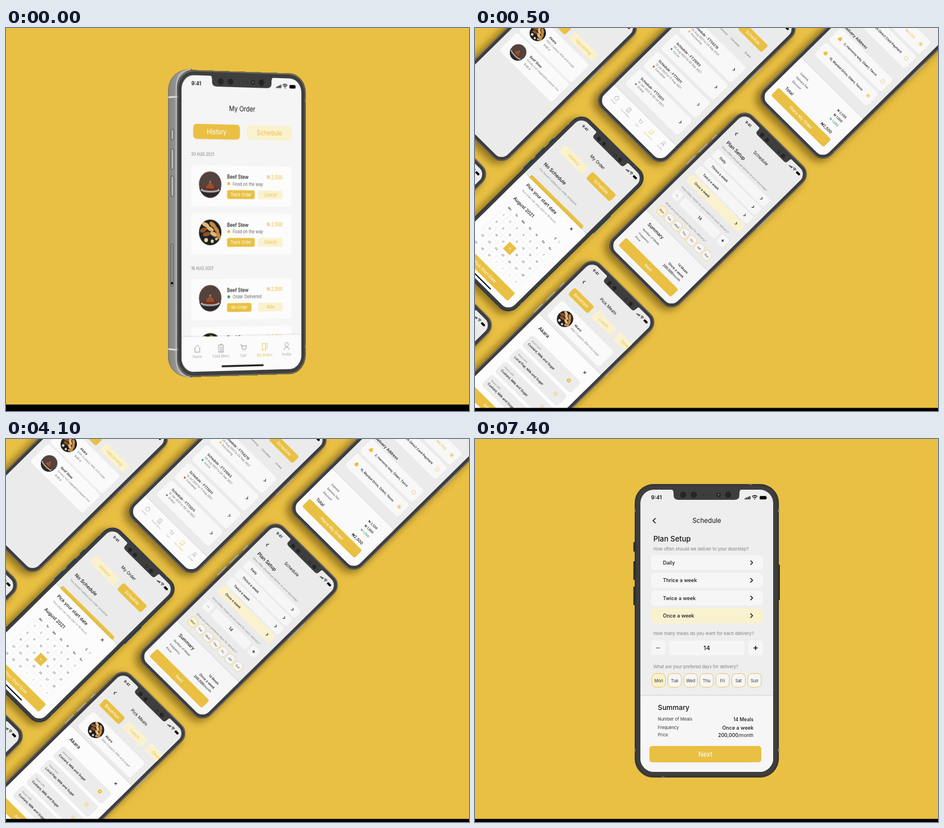
An HTML page for the animation above (8000 ms loop, 823 px wide and 680 px high).

```html
<!DOCTYPE html>
<html lang="en">
<head>
<meta charset="utf-8">
<title>Food ordering app showcase</title>
<style>
  html, body { margin: 0; width: 100%; height: 100%; overflow: hidden; background: #e9c043; }
  body { position: relative; }
  svg { position: absolute; left: 0; top: 0; overflow: visible; }
  text { font-family: Inter, sans-serif; white-space: pre; }
  .scene { position: absolute; left: 0; top: 0; width: 823px; height: 680px; overflow: hidden; visibility: hidden; }
  /* flat phone turned slightly away to the right */
  .turned { transform-origin: 0 0; transform: matrix3d(.9603,.0407,0,.00011, 0,1.054,0,0, 0,0,1,0, 312,83,0,1); }
  .shadow { filter: blur(10px); }
</style>
</head>
<body>
<svg width="0" height="0"><defs>
  <clipPath id="screen"><rect width="236" height="501" rx="24"/></clipPath>
  <linearGradient id="metal"><stop stop-color="#858683"/><stop offset=".5" stop-color="#a3a4a0"/><stop offset="1" stop-color="#8d8e8a"/></linearGradient>
</defs></svg>
<script>
const YELLOW = '#e9c043', PALE = '#faf2cf', INK = '#151515', GREY = '#82828a', GREEN = '#3b9a63';

// ---- drawing helpers; a phone screen measures 236 x 501 ----
const box = (x, y, w, h, fill, r = 5, extra = '') =>
  `<rect x="${x}" y="${y}" width="${w}" height="${h}" rx="${r}" fill="${fill}" ${extra}/>`;
const dot = (x, y, r, fill, extra = '') => `<circle cx="${x}" cy="${y}" r="${r}" fill="${fill}" ${extra}/>`;
const line = (d, color = INK, width = 1, extra = '') =>
  `<path d="${d}" fill="none" stroke="${color}" stroke-width="${width}" ${extra}/>`;
// y is the middle of the capitals
const text = (x, y, s, size, color = INK, weight = 400, anchor = 'start') =>
  `<text x="${x}" y="${y + size * .36}" font-size="${size}" fill="${color}" font-weight="${weight}" text-anchor="${anchor}">${s}</text>`;
const mid = (x, y, s, size, color, weight) => text(x, y, s, size, color, weight, 'middle');
const end = (x, y, s, size, color, weight) => text(x, y, s, size, color, weight, 'end');
const next = (x, y, s = 1) => line(`M${x - 2 * s} ${y - 4 * s}l${4 * s} ${4 * s}l${-4 * s} ${4 * s}`, INK, 1.5);
const cross = (x, y) => line(`M${x - 3} ${y - 3}l6 6m0-6l-6 6`, INK, 1.4);
const title = s => mid(118, 55, s, 11.6);
const back = () => line('M27 50.5l-4.5 4.5l4.5 4.5', INK, 1.6);
const button = (s, y = 455) => box(16, y, 199, 29, YELLOW, 5) + mid(115.5, y + 15, s, 11.4, '#fff');
const indicator = () => box(77.5, 491.5, 83, 3, '#111', 1.5);
const sheet = (y, fill) => box(0, y - 2, 236, 510 - y, '#00000010', 4) + box(0, y, 236, 510 - y, fill, 3);
const radio = (x, y, on) => dot(x, y, 5, 'none', `stroke="${YELLOW}"`) + (on ? dot(x, y, 2.6, YELLOW) : '');
const tab = (x, y, w, s, on) =>
  box(x, y, w, 25.5, on ? YELLOW : PALE, 6) + mid(x + w / 2, y + 12.7, s, 11.4, on ? '#fff' : YELLOW);

function statusBar() {
  const bars = [0, 1, 2, 3].map(i => box(185.5 + i * 2.7, 15 - i * 1.2, 1.9, 2.2 + i * 1.2, INK, .5)).join('');
  const wifi = line('M198.5 12.2q4.7-4 9.4 0M200.2 14.4q3-2.4 6 0', INK, 1.4) + dot(203.2, 16.4, 1, INK);
  return mid(28.5, 14, '9:41', 9.5, INK, 600) + bars + wifi +
    box(212, 11.2, 12, 6, '#000', 1.5) + box(224.4, 13, 1, 2.4, '#777', .5);
}

function notch() {
  const lens = [76, 95, 139, 156].map((x, i) => dot(x, 9, i === 2 ? 4 : 5.5, '#252525')).join('');
  return `<path d="M54 -1H181Q176 0 176 6V10Q176 18 167 18H68Q59 18 59 10V6Q59 0 54 -1Z" fill="#3e3e3e"/>` + lens +
    dot(139, 9, 1.4, '#777') + [111, 119, 127].map(x => dot(x, 9, .9, '#2b2b2b')).join('');
}

// edge: width of the frame around the screen
function phone(content, { bg = '#ebebeb', rim = '#4a4a4a', keys = '#33312d', edge = 9.5, buttons = true, shadow = false } = {}) {
  const ring = (e, fill, extra) => box(-e, -e, 236 + 2 * e, 501 + 2 * e, fill, 23.5 + e, extra);
  const sides = buttons ? [[-12.5, 93, 17], [-12.5, 127, 33], [-12.5, 172, 33], [244, 133, 63]]
    .map(([x, y, h]) => box(x, y, 4, h, keys, 1)).join('') : '';
  const bands = [[-edge - 1, 35, 2, 5], [235 + edge, 35, 2, 5], [-edge - 1, 460, 2, 5], [235 + edge, 460, 2, 5], [193, -edge - 1, 5, 2], [38, 500 + edge, 5, 2]]
    .map(([x, y, w, h]) => box(x, y, w, h, '#777', 0)).join('');
  return (shadow ? box(-18, 2, 264, 523, '#4a340088', 36, 'class="shadow"') : '') + sides +
    ring(edge, rim, 'stroke="#262626" stroke-width="1.2"') + ring(edge - 1.8, '#3e3e3e', 'stroke="#2a2a2a" stroke-width=".8"') + bands +
    `<g clip-path="url(#screen)">${box(0, 0, 236, 501, bg, 0)}${content}${statusBar()}</g>` + notch();
}

function dish(x, y, grilled) {
  const art = grilled
    ? dot(0, 0, 21.8, '#1d1f20') +
      [[-9, -13, 20], [5, -13, 35], [-13, -4, -20], [0, -6, 25], [12, -5, 50], [-7, 3, -12], [7, 3, 20], [16, 5, 70]].map(([a, b, r], i) =>
        `<ellipse cx="${a}" cy="${b}" rx="7.5" ry="3.6" fill="${['#e2b878', '#c98840', '#8f5325'][i % 3]}" transform="rotate(${r} ${a} ${b})"/>`).join('') +
      dot(-8, 13, 3.6, '#e8d6b8') + dot(4, 15, 3, '#e8d6b8') + dot(12, 11, 2.6, '#d9b98c')
    : dot(0, 0, 21.8, '#54423e') + `<path d="M-21 7A21.8 21.8 0 0 0 21 7Z" fill="#2f2827"/>` +
      `<ellipse cy="9.5" rx="18.5" ry="4.5" fill="#9fb2b8"/><ellipse cy="7.5" rx="16" ry="3.4" fill="#6e2e1a"/>` +
      `<path d="M-8 7Q-7 0 0-3Q7 0 8 7Z" fill="#96502f"/>` + dot(0, -4, 1.8, '#b98058');
  return `<g transform="translate(${x} ${y})">${art}</g>`;
}

function tabBar() {
  const icons = [
    ['Home', 30.5, 'M-6 0L0-6L6 0M-4.5-1V6H4.5V-1'],
    ['Food Menu', 76.5, 'M-4.5-5H4.5V7H-4.5ZM-2-6.5H2M-2.5-1H3M-2.5 2H3M-2.5 5H3'],
    ['Cart', 120.5, 'M-6-5H-4L-2 3H4.5L6-3H-3.5M-1.5 5.5V6.5M4 5.5V6.5'],
    ['My Orders', 162.5, 'M-5-6H2V6L-1.5 3L-5 6ZM2-6H5V2H2'],
    ['Profile', 206.5, 'M0-7A3.4 3.8 0 1 1-.1-7M-5 6Q-4.5 1 0 1Q4.5 1 5 6'],
  ];
  return sheet(442, '#fbfbfb') + icons.map(([label, x, d]) => {
    const color = label === 'My Orders' ? YELLOW : '#8c8c8c';
    return line(d, color, .9, `transform="translate(${x} 462)"`) + mid(x, 475.5, label, 6.2, color === YELLOW ? YELLOW : '#a5a5a5');
  }).join('');
}

const orderTabs = history => title('My Order') + tab(22.5, 82, 91, 'History', history) + tab(127, 82, 90, 'Schedule', !history);

// ---- screens ----
function historyScreen() {
  const order = (y, grilled, done) => box(18.4, y, 198, 69.5, '#fcfcfc') + dish(55.4, y + 32, grilled) +
    text(88.3, y + 19, 'Beef Stew', 8.7, INK, 500) + end(198.5, y + 19, '₦ 2,500', 8.3, YELLOW, 500) +
    dot(91.6, y + 30.5, 2.6, done ? GREEN : '#e8b52c') +
    text(99.3, y + 30.8, done ? 'Order Delivered' : 'Food on the way', 7.7, '#666') +
    box(88.3, y + 41.6, done ? 48 : 54.4, 15, YELLOW, 3) +
    mid(done ? 112.3 : 115.5, y + 49.2, done ? 'Re-Order' : 'Track Order', 7.4, '#fff') +
    box(149.4, y + 41.6, 49, 15, PALE, 3) + mid(174, y + 49.2, done ? 'Rate' : 'Cancel', 7.4, YELLOW);
  return orderTabs(true) + text(18.4, 133.5, '20 AUG 2021', 7.2, '#777') + order(152, false) + order(233.5, true) +
    text(18.4, 326.5, '19 AUG 2021', 7.2, '#777') + order(344.5, false, true) + order(426, true, true) + tabBar() + indicator();
}

function planScreen() {
  const options = ['Daily', 'Thrice a week', 'Twice a week', 'Once a week'].map((s, i) => {
    const y = 116.3 + i * 31.4;
    return box(19, y, 199, 26.5, i === 3 ? PALE : '#f6f6f6', 6) + text(40, y + 13.2, s, 9, INK, 500) + next(197.5, y + 13.2, .95);
  }).join('');
  const days = ['Mon', 'Tue', 'Wed', 'Thu', 'Fri', 'Sat', 'Sun'].map((s, i) => {
    const x = 20.5 + i * 28.4;
    return box(x, 326.5, 24, 24, i ? '#f6f6f6' : PALE, 7, `stroke="${YELLOW}" stroke-width=".9"`) + mid(x + 12, 338.8, s, 7.5, '#333');
  }).join('');
  return back() + title('Schedule') + text(23, 87, 'Plan Setup', 13, INK, 500) +
    text(23, 105, 'How often should we deliver to your doorstep?', 7.7, GREY) + options +
    text(23, 255.5, 'How many meals do you want for each delivery?', 7.8, GREY) +
    box(19, 267.5, 25, 26, '#f6f6f6') + box(51.5, 268, 133.5, 26, '#f6f6f6') + box(192, 268, 25.5, 26, '#f6f6f6') +
    line('M28 281h6.5', '#555', 1.2) + line('M201 281h7.5M204.7 277.2v7.5', INK, 1.6) + mid(118, 281, '14', 11, INK, 500) +
    text(23, 314.5, 'What are your prefered days for delivery?', 7.7, GREY) + days +
    sheet(366, '#f6f6f6') + text(31, 387, 'Summary', 12.3, INK, 500) +
    ['Number of Meals', 'Frequency', 'Price'].map((s, i) => text(31, [407, 422, 435][i], s, 7.5, '#333')).join('') +
    end(201, 407.5, '14 Meals', 8.5, INK, 500) + end(201, 423, 'Once a week', 9, INK, 500) +
    end(201, 436, '200,000<tspan font-weight="400" font-size="8">/month</tspan>', 8.9, INK, 500) + button('Next');
}

function calendarScreen() {
  const x0 = 28.5, y0 = 317, step = 25.5;
  let grid = '';
  for (let i = 0; i <= 7; i++) grid += line(`M${x0 + i * step} ${y0}v${5 * step}`, '#e6e6e6', .8);
  for (let i = 0; i <= 5; i++) grid += line(`M${x0} ${y0 + i * step}h${7 * step}`, '#e6e6e6', .8);
  for (let i = 0; i < 35; i++) {
    const x = x0 + (i % 7) * step, y = y0 + Math.floor(i / 7) * step, today = i === 17;
    if (today) grid += box(x, y, step, step, YELLOW, 0);
    grid += mid(x + step / 2, y + step / 2, i % 31 + 1, 7, today ? '#fff' : i > 30 ? '#aaa' : '#444');
  }
  return orderTabs(false) + text(20, 156, 'No Schedule', 13, INK, 500) +
    text(20, 175, "You haven't added any order schedule", 7.7, GREY) + box(17, 201, 199, 29, YELLOW) + sheet(211, '#fcfcfc') +
    text(27, 228.5, 'Pick your start date', 12, INK, 500) + text(28, 247.5, 'Your plan can only start in 18 hours', 7.7, GREY) + cross(197, 229.5) +
    text(28, 277, 'August 2021', 12.3, INK, 500) + line('M187 273.5l-3.5 3.5l3.5 3.5', '#333', 1.1) + line('M197 273.5l3.5 3.5l-3.5 3.5', '#aaa', 1.1) +
    ['Mo', 'Tu', 'We', 'Th', 'Fr', 'Sa', 'Su'].map((s, i) => mid(41.3 + i * step, 305.8, s, 7, INK, 500)).join('') +
    grid + button('Pick Start Date') + indicator();
}

function mealScreen() {
  const meals = ['Custard, Milk and Sugar', 'Local Pap, Milk and Sugar', 'Custard, Milk and Sugar', 'Custard, Milk and Sugar'].map((s, i) => {
    const y = 249 + i * 49.8;
    return box(28, y, 186, 41, '#ececec', 8) + text(39, y + 13, 'Akara with', 6.8, GREY) + text(38, y + 25, s, 8.7, INK, 500) +
      radio(186, y + 19, false) + (i ? dot(186, y + 19, 1.5, YELLOW) : dot(186, y + 19, 5, YELLOW) + dot(186, y + 19, 1.4, '#fff'));
  }).join('');
  return back() + title('Pick Meals') + tab(18, 82, 75, 'Breakfast', true) + tab(105, 82, 73, 'Lunch') + tab(190, 82, 72, 'Dinner') +
    box(18, 131.5, 200, 58, '#0000000c', 8) + box(18, 130, 200, 58, '#fafafa', 8) + dish(60.5, 159.5, true) +
    text(90, 152, 'Akara', 8.8, INK, 500) + text(89, 165.5, 'With Custard, Milk and sugar', 7.8, GREY) +
    sheet(198, '#fcfcfc') + text(28, 223.5, 'Akara', 13, INK, 500) + cross(201, 223.5) + meals + button('Add to Schedule');
}

function scheduleScreen() {
  const plans = [
    ['FT54219', '25 Aug 2021 to 24 Sep 2021', 'Processing', '#e8b52c'],
    ['FT31093', '05 Aug 2021 to 04 Sep 2021', 'Active', GREEN],
    ['FT73011', '12 Jul 2021 to 11 Aug 2021', 'Cancelled', '#d9541e'],
    ['FT73011', '10 Jan 2021 to 09 Jul 2021', 'Ended', '#777'],
  ];
  return orderTabs(false) +
    ['All', 'Active', 'Processing', 'Cancelled', 'Ended'].map((s, i) => mid([28, 60, 100, 147, 195][i], 137, s, 6.8, '#666')).join('') +
    plans.map(([id, dates, state, color], i) => {
      const y = 180.5 + i * 66.2;
      return box(18, y - 16, 200, 57, '#f8f8f8', 7) + text(38, y, 'Schedule - ' + id, 9.2, INK, 500) +
        text(39, y + 11.5, dates, 7.7, '#666') + dot(40, y + 21.5, 2.6, color) + text(47.5, y + 22, state, 7.5, '#666') + next(198, y + 10);
    }).join('') + tabBar();
}

function checkoutScreen() {
  const row = (y, on) => box(18, y - 23, 200, 46, '#f8f8f8', 7) + radio(201, y, on);
  const place = (y, s, on) => row(y, on) + box(33.5, y - 3.5, 10, 8, YELLOW, 2) + box(35.5, y - 6, 6, 4, YELLOW, 1) + text(55, y, s, 8.5, INK, 500);
  const cost = (y, name, price, color) => text(29, y, name, 7.4, '#333') + end(202, y, price, 8.3, color, 500);
  return title('Checkout') + row(104, true) + text(40, 104, 'Pay on Delivery', 8.8, INK, 500) + end(180, 104, '(₦4,200)', 8.5, YELLOW) +
    row(158, false) + end(181, 156, 'Pay with Direct Card Payment', 8.7, INK, 500) +
    text(23, 212, 'Delivery Address', 10.3, INK, 500) +
    place(245, '2, Harmony way, Odani, Tavos') + place(299, '15, Maribel Drive, Odani, Tavos', true) + sheet(352, '#fafafa') +
    cost(382, 'Subtotal', '₦ 2,500') + cost(397, 'Delivery Fee', '₦ 1,000') + cost(412, 'Discount', '₦ 1,000', GREEN) +
    text(29, 437, 'Total', 11.5, INK, 500) + end(203, 437, '₦2,500', 10.8, INK, 500) + button('Place My Order', 450);
}

function upcomingScreen() {
  const meal = (y, name, note, grilled) => box(18, y - 36, 200, 68, '#fafafa', 7) + dish(58.5, y, grilled) +
    text(89, y - 15, name, 8.8, INK, 500) + text(89, y - 3, note, 7.7, GREY) + text(92, y + 10, '8:45 d', 7.4, '#555');
  return title('My Meals') + tab(22.5, 122, 91, 'Today', true) + tab(127, 122, 90, 'Upcoming') +
    meal(194, 'Akara', 'With Custard, Milk and sugar', true) + meal(266.5, 'Beef Stew', 'Smoky hot vegetable pepper mix', false);
}

// ---- scenes ----
const stage = s => `<svg width="823" height="680">${s}</svg>`;
const floor = y => box(0, y, 823, 680 - y, '#000', 0);

function turnedScene() {
  const outline = 'M330 72.8Q291 75 288.5 110V586Q291 618 330 620.5L340 600V90Z';
  const keys = [[180, 18], [215, 36], [263, 36]].map(([y, h]) =>
    box(293.5, y, 4.5, h, '#b9bab6', 1, 'stroke="#333" stroke-width=".8"')).join('');
  const side = `<path d="${outline}" fill="url(#metal)" stroke="#5c5c58" stroke-width=".8"/>` + keys +
    line('M288.5 123L304 122M288.5 570L304 571.5', '#dcdcd8', 3) +
    box(292.5, 383, 5, 76, 'none', 2.5, 'stroke="#555" stroke-width=".8"') + dot(295, 453, 2.2, '#111') +
    line('M328 73.5Q304 75 302.5 104V590Q304 618 328 620', '#c9c9c4', 1.5);
  return stage(side + floor(668.5)) +
    `<svg class="turned" width="236" height="501">${phone(historyScreen(), { bg: '#f5f5f5', rim: '#a9a9a5', edge: 8, buttons: false })}</svg>`;
}

function wallScene() {
  const wall = [
    [-90.8, 150.6, ''], [-80.8, 418.6, ''],
    [177.2, -109.4, upcomingScreen()],
    [189.2, 157.6, calendarScreen(), '#1d5178'],
    [459.2, -107.4, scheduleScreen()],
    [479.2, 150.6, planScreen()],
    [748.2, -113.4, checkoutScreen()],
    [208.2, 413.6, mealScreen()],
  ];
  return stage(wall.map(([x, y, content, rim = '#bdbab2']) =>
    `<g transform="matrix(.467 .462 -.479 .471 ${x} ${y})">${phone(content, { rim, keys: rim, shadow: true })}</g>`).join('') + floor(674.5));
}

const frontScene = () => stage(`<g transform="translate(294 90)">${phone(planScreen(), { bg: '#eeeeee' })}</g>` + floor(674.5));

const scenes = [turnedScene, wallScene, frontScene].map(build => {
  const scene = document.createElement('div');
  scene.className = 'scene';
  scene.innerHTML = build();
  return document.body.appendChild(scene);
});

function render() {
  const t = performance.now() % 8000;
  const current = t < 500 ? 0 : t < 6500 ? 1 : 2;
  scenes.forEach((scene, i) => scene.style.visibility = i === current ? 'visible' : 'hidden');
  requestAnimationFrame(render);
}
render();
</script>
</body>
</html>
```
